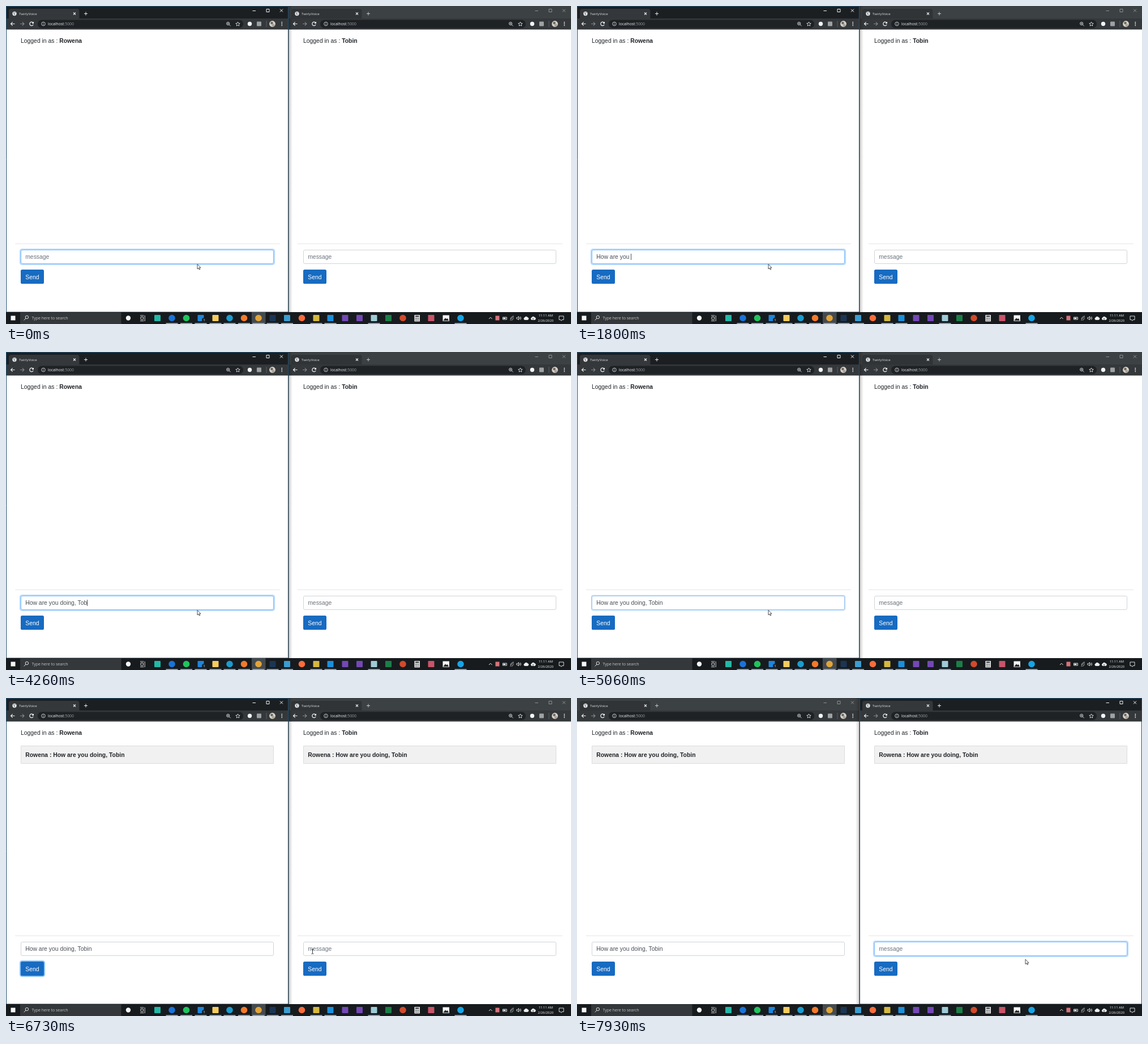
Animation, 998 px wide and 561 px high, one loop 8000 ms. Source, as an HTML page with a canvas:

```html
<!DOCTYPE html>
<html lang="en">
<head>
<meta charset="utf-8">
<title>Two chat windows</title>
<style>
  html, body { margin: 0; width: 100%; height: 100%; overflow: hidden; background: #fff; }
  canvas { display: block; }
</style>
</head>
<body>
<canvas id="stage" width="998" height="561"></canvas>
<script>
const ctx = document.getElementById('stage').getContext('2d');
const LOOP = 8000, BLINK = 530;
const PAGE = '10.4px "Liberation Sans", sans-serif';
const BOLD = 'bold ' + PAGE;
const ui = size => size + 'px "Open Sans", sans-serif';

const MESSAGE = 'How are you doing, Tobin';
const SENDER = 'Rowena', RECEIVER = 'Tobin', TITLE = 'TwirlyVoice';
// Typing bursts: start time, delay per key, number of keys
const BURSTS = [[250, 130, 12], [2000, 130, 5], [3530, 150, 7]];
const BLUR = 4990, BUTTON_FOCUS = 5060, SENT = 5460, CLICK = 6920, REFOCUS = 7000;
// Pointer moves: start, end, from, to
const MOVES = [[6230, 6800, [338, 455.5], [550, 447]], [7100, 7650, [550, 447], [792, 461]]];

const ramp = (t, from, to) => {
  const p = Math.min(1, Math.max(0, (t - from) / (to - from)));
  return p * p * (3 - 2 * p);
};
const fade = (t, start) => ramp(t, start, start + 150);

function rect(x, y, w, h, fill, r = 0) {
  ctx.fillStyle = fill;
  ctx.beginPath();
  ctx.roundRect(x, y, w, h, r);
  ctx.fill();
}
function frame(x, y, w, h, color, r = 0, width = 1) {
  ctx.strokeStyle = color;
  ctx.lineWidth = width;
  ctx.beginPath();
  ctx.roundRect(x, y, w, h, r);
  ctx.stroke();
}
function disc(x, y, r, fill) {
  ctx.fillStyle = fill;
  ctx.beginPath();
  ctx.arc(x, y, r, 0, 7);
  ctx.fill();
}
function path(d, color, width = 1, fill) {
  const shape = new Path2D(d);
  if (fill) { ctx.fillStyle = fill; ctx.fill(shape); }
  ctx.strokeStyle = color;
  ctx.lineWidth = width;
  ctx.stroke(shape);
}
function text(s, x, y, font, color, align = 'left') {
  ctx.font = font;
  ctx.fillStyle = color;
  ctx.textAlign = align;
  ctx.fillText(s, x, y);
}

function typing(t) {
  let count = 0, last = 0;
  for (const [start, gap, keys] of BURSTS) {
    if (t < start) break;
    const done = Math.min(keys, Math.floor((t - start) / gap) + 1);
    count += done;
    last = start + (done - 1) * gap;
  }
  const caret = count > 0 && Math.floor((t - last) / BLINK) % 2 === 0;
  return { value: MESSAGE.slice(0, count), caret: caret && t < BLUR };
}

function browserBar(active) {
  rect(0, 0, 499, 23, active ? '#1c1f22' : '#3c4143');
  rect(5, 5, 124.5, 20, active ? '#34383b' : '#303437', 4);
  rect(0, 22, 499, 19.5, '#34383b');
  rect(56, 24.5, 363, 14.5, '#1f2225', 7.2);

  disc(15, 13.5, 3.7, '#e4e6e8');
  path('M13 11l2 1.5-1 1.5 2 2M16 11l1 1', '#555a5e', 1);
  text(TITLE, 23, 15.8, ui(6.1), '#e0e2e4');
  path('M119 11.5l4 4m0-4l-4 4', '#e8eaed', 1.1);
  path('M138 13.5h6m-3-3v6', active ? '#e8eaed' : '#c4c7c9', 1);
  const control = active ? '#f4f4f4' : '#8d9193';
  path('M435.5 8.5h5.5M484 5.5l5 5m0-5l-5 5', control, 1);
  frame(460, 5.5, 5, 5, control);

  path('M15.5 31.5h-7m3.2-3.2l-3.2 3.2 3.2 3.2', '#f1f3f4', 1.2);
  path('M25 31.5h7m-3.2-3.2l3.2 3.2-3.2 3.2', '#85898c', 1.1);
  path('M48 29.8a3.3 3.3 0 1 0 .2 2.8M48.4 28v2.3h-2.4', '#f1f3f4', 1.2);
  path('M69.3 31.5a3.3 3.3 0 1 1-6.6 0a3.3 3.3 0 1 1 6.6 0M66 31v2.2M66 29.3v.9', '#d5d8da', .9);
  text('localhost', 74, 34.2, ui(6.8), '#f1f3f4');
  const hostWidth = ctx.measureText('localhost').width;
  text(':5000', 74 + hostWidth, 34.2, ui(6.8), '#9aa0a6');
  path('M394.8 31a2.6 2.6 0 1 1-5.2 0a2.6 2.6 0 1 1 5.2 0M394.3 33l2.4 2.4M391 31h2.4m-1.2-1.2v2.4', '#e0e2e4', .9);
  path('M409.5 28l1.1 2.4 2.6.3-1.9 1.8.5 2.6-2.3-1.3-2.3 1.3.5-2.6-1.9-1.8 2.6-.3z', '#e0e2e4', .9);
  disc(430.5, 31.5, 3.7, '#f5f5f5');
  rect(443, 27.5, 8, 8, '#9da1a3', 1);
  rect(459.5, 26, 1, 11, '#5d6164');
  disc(470.5, 31.5, 5.4, '#d5d1c8');
  disc(469.5, 30, 2.3, '#6e675f');
  disc(472, 34, 2.5, '#aaa296');
  for (const y of [28.7, 31.5, 34.3]) disc(487.3, y, .9, '#f1f3f4');
}

// A focus ring grows around a control by "amount"
function ring(x, y, w, h, color, amount) {
  const s = 2.1 * amount;
  if (s) rect(x - s, y - s, w + 2 * s, h + 2 * s, color, 2.6 + s);
}

function chatWindow(x, user, state) {
  ctx.save();
  ctx.translate(x, 0);
  rect(0, 0, 499, 540, '#fff');
  browserBar(state.active);

  text('Logged in as : ', 26, 64.5, PAGE, '#212529');
  text(user, 26 + ctx.measureText('Logged in as : ').width, 64.5, BOLD, '#212529');
  if (state.sent) {
    rect(26, 84, 447, 32, '#f1f1f1');
    frame(26.5, 84.5, 446, 31, '#dcdcdc');
    text(SENDER + ' : ' + MESSAGE, 34.2, 104, BOLD, '#212529');
  }
  rect(16, 419, 468, 1, '#e6e6e6');

  ring(26, 430, 447, 25, '#b5dafc', state.inputFocus);
  rect(26, 430, 447, 25, '#fff', 2.6);
  frame(26.5, 430.5, 446, 24, '#ced4da', 2.4);
  ctx.globalAlpha = state.inputFocus;
  frame(26.5, 430.5, 446, 24, '#80bdff', 2.4);
  ctx.globalAlpha = 1;
  text(state.value || 'message', 34.2, 446.3, PAGE, state.value ? '#495057' : '#6c757d');
  if (state.caret) {
    const end = state.value ? ctx.measureText(state.value).width : 0;
    rect(34 + Math.round(end), 437, 1, 11, '#495057');
  }

  ring(26, 465, 41, 25, '#8fc5fb', state.buttonFocus);
  rect(26, 465, 41, 25, '#176bc1', 2.6);
  text('Send', 46.5, 481.6, PAGE, '#fff', 'center');
  ctx.restore();
}

function windowEdges(active) {
  const x = active * 499;
  const shade = ctx.createLinearGradient(active ? 499 : 499.5, 0, active ? 492 : 506, 0);
  shade.addColorStop(0, 'rgba(0,0,0,.2)');
  shade.addColorStop(1, 'rgba(0,0,0,0)');
  ctx.fillStyle = shade;
  ctx.fillRect(active ? 492 : 499, 0, 7, 540);
  frame(x + .5, .5, 498, 539.5, '#22506f');
  rect(498.5, 41, 1, 499, '#26343d');
}

const SQUARE = 0, ROUND = 1;
// Taskbar apps: centre, colour, shape, is running
const APPS = [
  [267.5, '#22b8a7', SQUARE, 0], [293, '#1a73d8', ROUND, 1], [318.5, '#20c45d', ROUND, 1],
  [344, '#1d86dc', SQUARE, 1], [370, '#f6cc5e', SQUARE, 1], [395, '#1b9ccf', ROUND, 1],
  [420.5, '#f47a2a', ROUND, 1], [446, '#e2a43a', ROUND, 1], [471, '#1c3553', SQUARE, 1],
  [496.5, '#3a9dd0', SQUARE, 1], [522.5, '#fa6d3b', ROUND, 0], [548, '#d6b83e', SQUARE, 1],
  [573, '#1c8fdb', SQUARE, 1], [599, '#7448b5', SQUARE, 0], [624.5, '#7448b5', SQUARE, 0],
  [650, '#9fcbd6', SQUARE, 1], [675.5, '#1b7f47', SQUARE, 0], [701, '#d24a2b', ROUND, 0],
  [751, '#c95468', SQUARE, 0], [803, '#16a5e6', ROUND, 1]
];

function taskbar() {
  rect(0, 540, 998, 21, '#171b1e');
  rect(8.5, 546.5, 8, 8, '#f5f5f5');
  rect(25, 540.5, 178.5, 20.5, '#34383a');
  path('M39.6 549a2.7 2.7 0 1 1-5.4 0a2.7 2.7 0 1 1 5.4 0M35 551l-3.3 3.4', '#e0e0e0', 1);
  text('Type here to search', 45.5, 553.3, ui(7), '#c5c7c8');
  disc(216, 550.5, 4.2, '#f5f5f5');
  frame(238, 548.5, 4.5, 4.5, '#e8e8e8', 0, .9);
  path('M237 546h6.5M237 555.5h6.5M245.2 546v10', '#e8e8e8', .9);

  rect(434, 540, 24.5, 21, '#454a4d');
  for (const [x, color, shape, running] of APPS) {
    if (shape === ROUND) disc(x, 550.5, 5.8, color);
    else rect(x - 5.5, 545, 11, 11, color, 1);
    if (running) rect(x - 10.5, 559.3, 21, 1.7, '#74b8e8');
  }
  disc(350, 554, 4, '#1b1f22');
  text('1', 350, 556.2, ui(6), '#fff', 'center');

  // Calculator and picture viewer
  rect(721.5, 545, 9.5, 11.5, '#f4f4f4');
  rect(723, 546.3, 6.5, 2, '#202427');
  for (let i = 0; i < 9; i++) rect(723 + i % 3 * 2.5, 549.7 + Math.floor(i / 3) * 2.1, 1.4, 1.3, '#202427');
  rect(771.5, 545.5, 11.5, 10.5, '#f4f4f4');
  path('M772.5 555l3.5-4.5 2 2 1.5-1.5 2.5 4z', '#202427', .3, '#202427');

  // Tray
  path('M853 552l2.8-2.8 2.8 2.8', '#f0f0f0', 1);
  rect(864.5, 546.5, 7, 8, '#d9737a');
  frame(877.5, 549, 7, 4, '#f0f0f0', 0, .9);
  rect(878.5, 550, 4, 2, '#f0f0f0');
  path('M891 555a6 6 0 0 1 6-6M893.5 555a3.5 3.5 0 0 1 3.5-3.5M891 552a7 7 0 0 1 6-5', '#b9bcbe', .9);
  path('M902 549.5h1.6l2-2v6.5l-2-2h-1.6zM907 549.2q1 1.4 0 3M908.6 548q2 2.7 0 5.4', '#f0f0f0', .9);
  for (const x of [918.5, 931]) {
    path(`M${x - 2.5} 553.5a2 2 0 0 1 0-3.6a3 3 0 0 1 5.3-.3a2 2 0 0 1 .2 3.9z`, '#f0f0f0', .8, '#f0f0f0');
  }
  rect(930.5, 550.5, 1, 3, '#171b1e');
  text('11:11 AM', 953.3, 548.3, ui(5.8), '#f5f5f5', 'center');
  text('2/26/2020', 953.3, 557.2, ui(5.8), '#f5f5f5', 'center');
  path('M977 547h8v6.5h-3l-1.2 1.8-1.2-1.8h-2.6z', '#f0f0f0', .9);
}

function pointer(t) {
  let [x, y] = MOVES[0][2];
  for (const [start, end, a, b] of MOVES) {
    if (t < start) break;
    const p = ramp(t, start, end);
    x = a[0] + (b[0] - a[0]) * p;
    y = a[1] + (b[1] - a[1]) * p;
  }
  const column = x % 499;
  const overInput = column > 26 && column < 473 && y > 430 && y < 455;
  ctx.save();
  ctx.translate(x, y);
  if (overInput) path('M-2 -4h1.4l.6.5.6-.5h1.4M0 -3.5v7M-2 4h1.4l.6-.5.6.5h1.4', '#222', .9);
  else path('M0 0v8.5l2-1.8 1.4 3 1.4-.7-1.4-2.8h2.6z', '#222', .8, '#fff');
  ctx.restore();
}

function draw(now) {
  const t = now % LOOP;
  const active = t < CLICK ? 0 : 1;
  const sent = t >= SENT;
  const refocus = fade(t, REFOCUS);
  chatWindow(0, SENDER, {
    active: !active, sent, ...typing(t),
    inputFocus: 1 - fade(t, BLUR),
    buttonFocus: fade(t, BUTTON_FOCUS) - refocus
  });
  chatWindow(499, RECEIVER, {
    active: !!active, sent, value: '',
    caret: t >= CLICK && Math.floor((t - CLICK) / BLINK) % 2 === 0,
    inputFocus: refocus, buttonFocus: 0
  });
  windowEdges(active);
  taskbar();
  pointer(t);
  requestAnimationFrame(draw);
}
requestAnimationFrame(draw);
</script>
</body>
</html>
```
